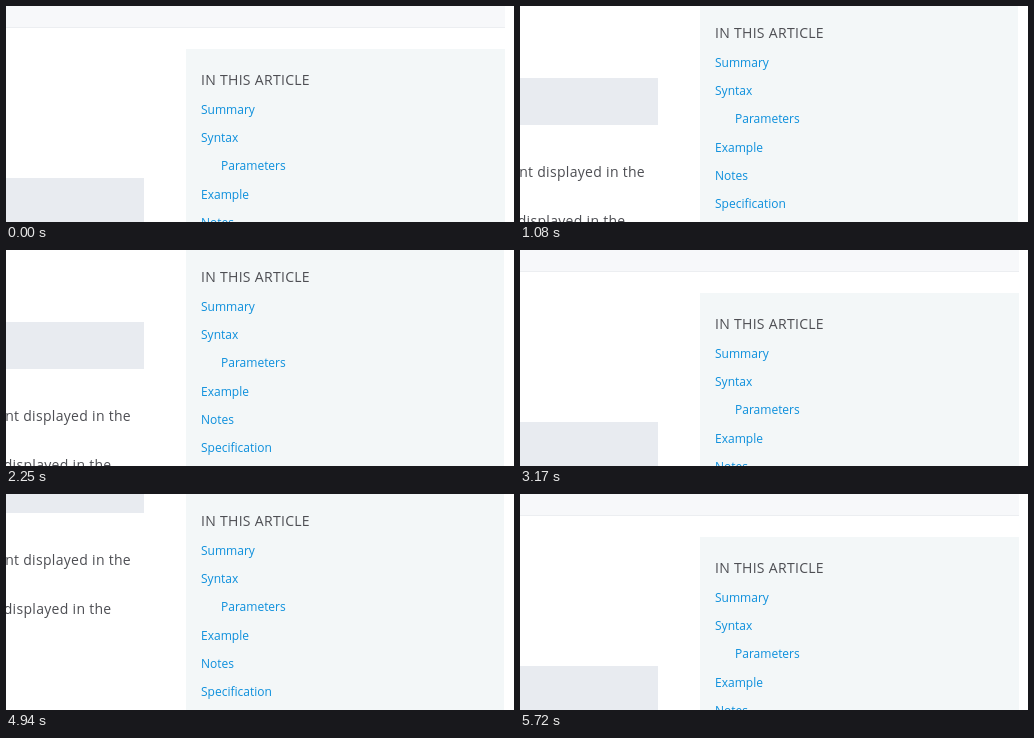
Write an HTML page with a canvas that moves like this. It is 508 px wide and 216 px high and loops after 7000 ms.

```html
<!DOCTYPE html>
<html lang="en">
<head>
<meta charset="utf-8">
<title>Sticky table of contents</title>
<style>
  html, body { margin: 0; width: 100%; height: 100%; overflow: hidden; background: #fff; }
  canvas { display: block; }
</style>
</head>
<body>
<canvas id="stage" width="508" height="216"></canvas>
<script>
const ctx = document.getElementById('stage').getContext('2d');
const LOOP = 7000;
const FLOW = 43;    // sidebar top in the page
const STUCK = -4;   // sidebar top when fixed to the viewport

// time, page scroll, sidebar fixed; the sidebar reacts just after each scroll
const steps = [
  [0, 0, false],
  [340, 100, false], [430, 100, true],
  [880, 200, true], [1080, 100, true], [1450, 0, false],
  [2200, 100, false], [2250, 100, true],
  [3140, 0, true], [3170, 0, false],
  [4380, 100, false], [4450, 100, true],
  [4940, 200, true], [5290, 100, true],
  [5660, 0, true], [5720, 0, false]
];

const links = ['Summary', 'Syntax', 'Parameters', 'Example', 'Notes', 'Specification'];

function rect(x, y, w, h, color) {
  ctx.fillStyle = color;
  ctx.fillRect(x, y, w, h);
}

function text(str, x, y, size, color, spacing = 0, align = 'left') {
  ctx.font = `${size}px "Open Sans", sans-serif`;
  ctx.letterSpacing = spacing + 'px';
  ctx.textAlign = align;
  ctx.fillStyle = color;
  ctx.fillText(str, x, y);
}

function drawPage(scroll) {
  rect(0, -scroll, 499, 21, '#f7f8fa');
  rect(0, 21 - scroll, 499, 1, '#eceef1');
  rect(0, 172 - scroll, 138, 47, '#e8ebf0');
  text('element displayed in the', 125, 271 - scroll, 14, '#4d4e53', 0.3, 'right');
  text('displayed in the', 105.5, 320 - scroll, 14, '#4d4e53', 0.3, 'right');
}

function drawSidebar(top, fixed) {
  rect(180, top, fixed ? 318 : 319, 400, '#f3f7f8');
  text('IN THIS ARTICLE', 195, top + 36, 14, '#4d4e53', 0.3);
  links.forEach((name, i) => {
    const x = name === 'Parameters' ? 215 : 195;
    text(name, x, top + 65 + Math.round(i * 28.2), 12, '#0c8fdc');
  });
}

function draw(t) {
  const [, scroll, fixed] = steps.findLast(step => step[0] <= t);
  rect(0, 0, 508, 216, '#fff');
  drawPage(scroll);
  drawSidebar(fixed ? STUCK : FLOW - scroll, fixed);
}

const start = performance.now();
function tick() {
  draw((performance.now() - start) % LOOP);
  requestAnimationFrame(tick);
}
tick();
</script>
</body>
</html>
```
